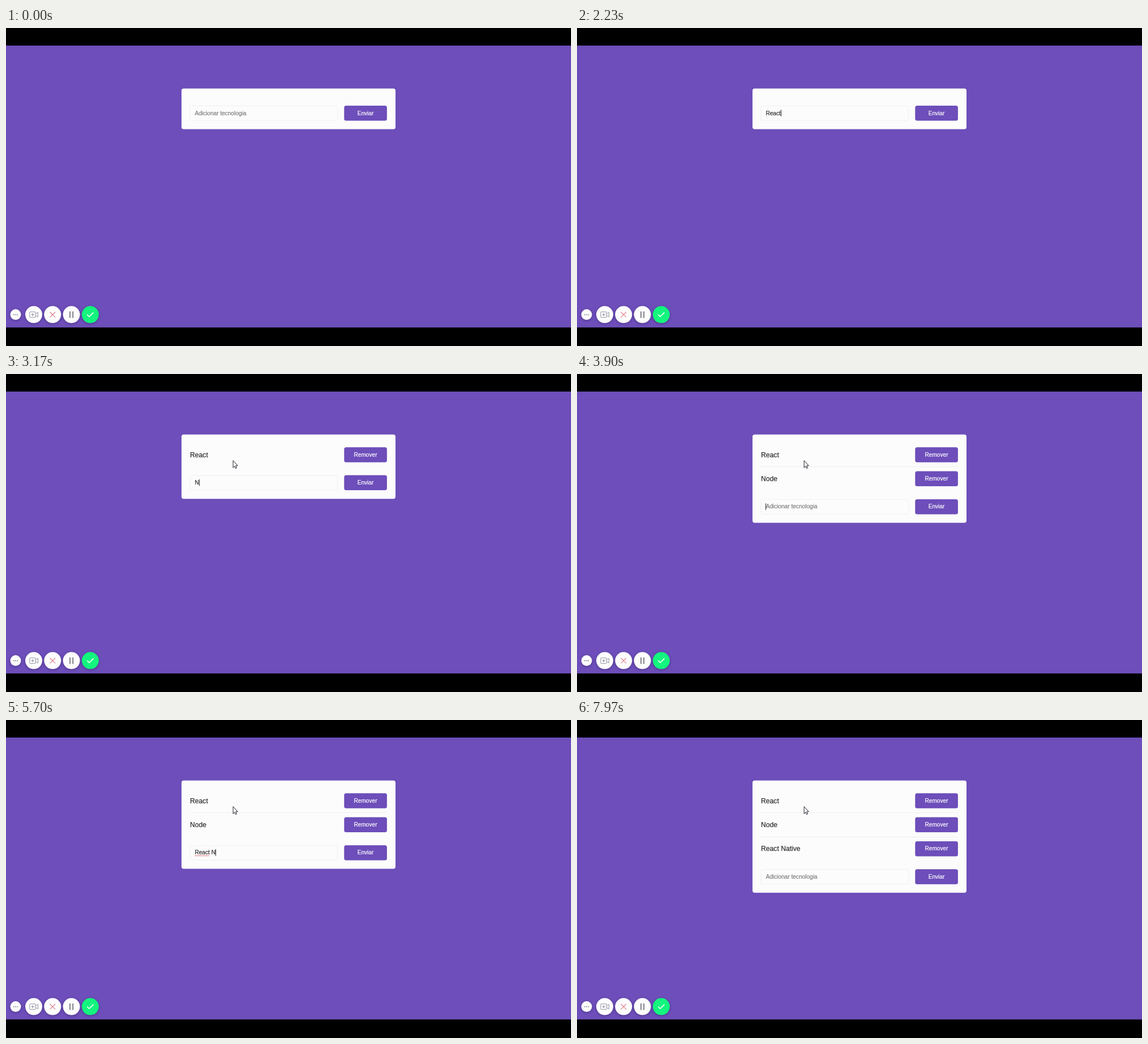
An HTML page with a canvas that plays this animation: 998x561 px, repeating every 8 s.

```html
<!DOCTYPE html>
<html lang="pt-BR">
<head>
<meta charset="utf-8">
<title>Tecnologias</title>
<style>
html, body { margin: 0; width: 100%; height: 100%; overflow: hidden; background: #000; }
canvas { display: block; width: 998px; height: 561px; }
</style>
</head>
<body>
<canvas id="stage" width="998" height="561"></canvas>
<script>
const ctx = document.getElementById('stage').getContext('2d');
const LOOP = 8000;
const BLINK = 530;
const PURPLE = '#6d4eba';
const INK = '#2b2b2b';
const FONT = '"Liberation Sans", Arial, sans-serif';
const SMALL = '10.13px ' + FONT;
const LARGE = '12.16px ' + FONT;

// Each entry: word, key press times, Enter time
const entries = [
  ['React', [1370, 1680, 1800, 1950, 2110], 2370],
  ['Node', [2990, 3260, 3400, 3540], 3810],
  ['React Native', [4390, 4540, 4690, 4870, 5010, 5200, 5480, 5720, 5900, 6080, 6260, 6440], 7170]
];

function stateAt(t) {
  const items = [];
  let value = '', lastKey = -760;
  for (const [word, keys, enter] of entries) {
    if (t >= enter) {
      items.push(word);
      lastKey = enter;
      continue;
    }
    const typed = keys.filter(k => t >= k);
    value = word.slice(0, typed.length);
    if (typed.length) lastKey = typed[typed.length - 1];
    break;
  }
  const hold = items.length === 3 ? 630 : BLINK;
  const since = t - lastKey;
  const caret = since < hold || Math.floor((since - hold) / BLINK) % 2 === 1;
  return { items, value, caret };
}

function box(x, y, w, h, r, fill, stroke) {
  ctx.beginPath();
  ctx.roundRect(x, y, w, h, r);
  if (fill) { ctx.fillStyle = fill; ctx.fill(); }
  if (stroke) { ctx.strokeStyle = stroke; ctx.lineWidth = 1; ctx.stroke(); }
}

// A hairline outline gives the slightly heavier screen rendering
function text(s, x, y, font, color, align = 'left') {
  ctx.font = font;
  ctx.fillStyle = ctx.strokeStyle = color;
  ctx.lineWidth = 0.2;
  ctx.textAlign = align;
  ctx.fillText(s, x, y);
  ctx.strokeText(s, x, y);
}

function path(points, color, width, close) {
  ctx.beginPath();
  points.forEach(([x, y]) => ctx.lineTo(x, y));
  if (close) ctx.closePath();
  ctx.strokeStyle = color;
  ctx.lineWidth = width;
  ctx.stroke();
}

function button(label, y) {
  box(597.3, y, 75.6, 26.5, 3.5, PURPLE);
  text(label, 635, y + 16.5, SMALL, '#fff', 'center');
}

function disc(x, r, color) {
  ctx.save();
  ctx.shadowColor = 'rgba(20,10,50,.35)';
  ctx.shadowBlur = 4;
  ctx.shadowOffsetY = 1.2;
  ctx.fillStyle = color;
  ctx.beginPath();
  ctx.arc(x, 505.6, r, 0, 7);
  ctx.fill();
  ctx.restore();
}

function recorder() {
  const grey = '#9293a3';
  disc(17, 9.5, '#fdfdfd');
  for (const x of [49, 82.3, 115.6]) disc(x, 15, '#fdfdfd');
  disc(148.9, 15, '#13f57e');
  ctx.fillStyle = '#74747f';
  for (const x of [13, 16.2, 19.4]) ctx.fillRect(x, 505, 1.7, 1.5);

  box(41.8, 500.8, 10.4, 9.8, 1, null, grey);
  path([[52.5, 504.2], [56.4, 501.6], [56.4, 509.8], [52.5, 507.2]], grey, 1);
  path([[44.6, 505.7], [49.6, 505.7]], grey, 1.2);
  path([[47.1, 503.2], [47.1, 508.2]], grey, 1.2);

  path([[77.5, 501], [87.1, 510.4]], '#e48793', 1.3);
  path([[87.1, 501], [77.5, 510.4]], '#e48793', 1.3);
  ctx.fillStyle = '#85868f';
  ctx.fillRect(112, 500, 2.1, 11.5);
  ctx.fillRect(117.1, 500, 2.1, 11.5);
  path([[143.4, 505.6], [147, 509.2], [154.4, 501.9]], '#fff', 1.6);
}

function pointer() {
  const shape = [[401.3, 153.2], [401.3, 164.8], [403.8, 162.4], [405.6, 166.2],
    [407.3, 165.4], [405.6, 161.8], [408.8, 161.5]];
  path(shape, '#34343e', 1.2, true);
  ctx.fillStyle = '#fff';
  ctx.fill();
  path(shape, '#34343e', 0.7, true);
}

function squiggle(x, y, w) {
  const points = [];
  for (let i = 0; i <= w; i += 1.5) points.push([x + i, y + (i / 1.5 % 2 ? 1 : -0.4)]);
  path(points, '#e0555a', 0.9);
}

function field(y, value, caret) {
  const x = 333.4, base = y + 16.5;
  box(324.7, y + 0.4, 261, 26, 3.5, null, '#f0f0f2');
  text(value || 'Adicionar tecnologia', x, base, SMALL, value ? INK : '#7b7b7b');
  if (value.startsWith('React ')) squiggle(x, y + 18.2, ctx.measureText('React').width);
  if (caret) {
    const end = x + (value ? ctx.measureText(value).width : 0);
    ctx.fillStyle = INK;
    ctx.fillRect(Math.round(end), y + 7.3, 1, 11.5);
  }
}

function draw(t) {
  const { items, value, caret } = stateAt(t);
  const n = items.length;
  const grow = n ? n * 42.3 - 0.7 : 0;

  ctx.fillStyle = '#000';
  ctx.fillRect(0, 0, 998, 561);
  ctx.fillStyle = PURPLE;
  ctx.fillRect(0, 31, 998, 497.3);
  box(310, 106.8, 378, 71.8 + grow, 4, '#fcfcfc');

  items.forEach((name, i) => {
    const y = 129.3 + i * 42.3;
    text(name, 325, y + 17.3, LARGE, INK);
    button('Remover', y);
    if (i < n - 1) {
      ctx.fillStyle = '#eee';
      ctx.fillRect(325, Math.round(y + 34), 348, 1);
    }
  });

  field(137 + grow, value, caret);
  button('Enviar', 137 + grow);
  recorder();
  if (n) pointer();
}

function tick() {
  draw(performance.now() % LOOP);
  requestAnimationFrame(tick);
}
tick();
</script>
</body>
</html>
```
